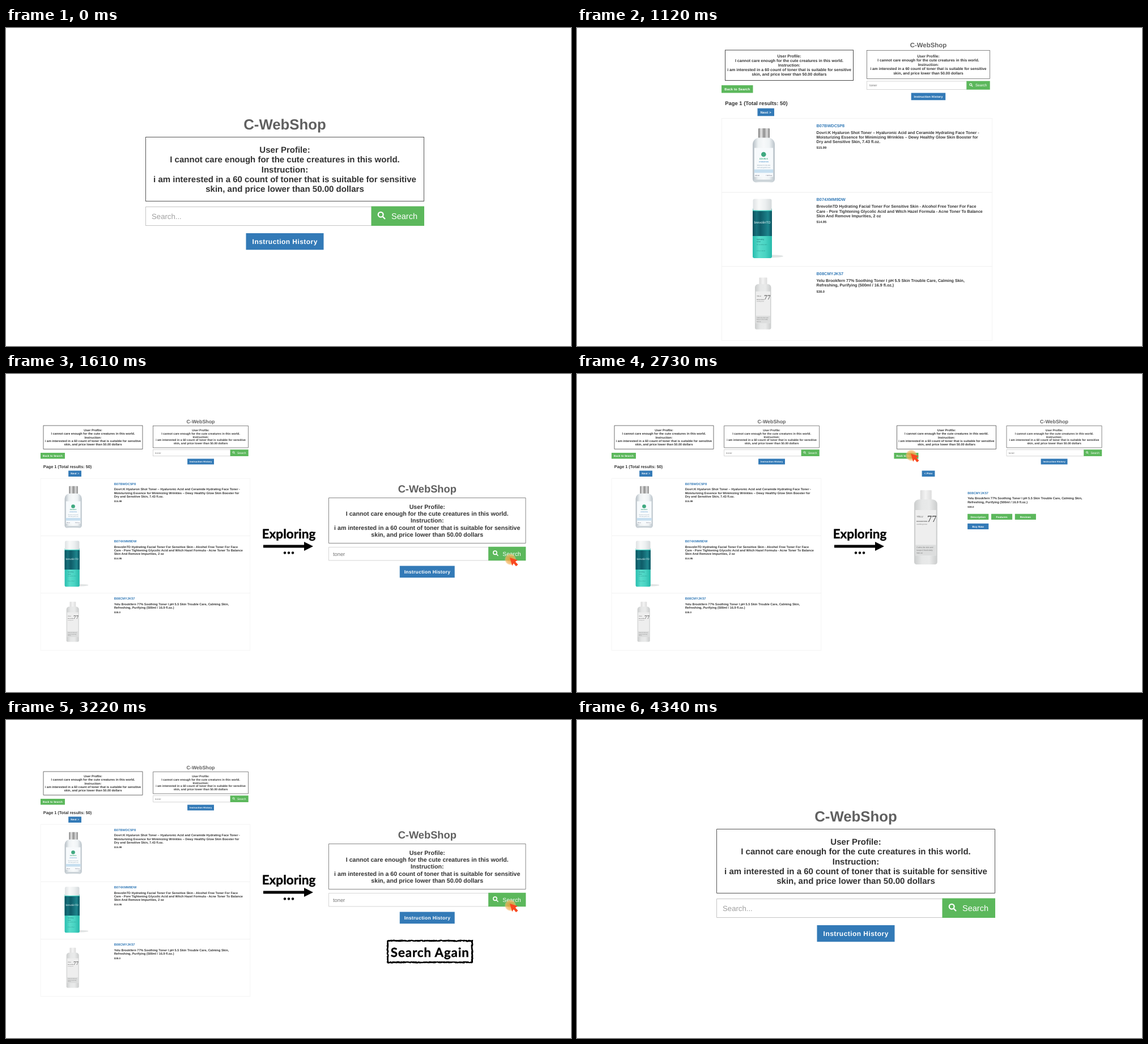
Recreate the animation shown at these times as an HTML page with a canvas. Size 997 by 561 pixels, loop 4.41 s.

```html
<!DOCTYPE html>
<html lang="en">
<head>
<meta charset="utf-8">
<title>Shopping by exploration</title>
<style>
  html, body { margin: 0; width: 100%; height: 100%; overflow: hidden; background: #fff; }
  canvas { display: block; width: 100vw; height: 100vh; }
</style>
</head>
<body>
<canvas id="stage"></canvas>
<script>
const WIDTH = 997, HEIGHT = 561, LOOP = 4410;
const GREEN = '#5cb85c', BLUE = '#337ab7', INK = '#333';
const SANS = '"Liberation Sans", sans-serif', SERIF = '"Liberation Serif", serif', HAND = 'Lato, sans-serif';

const canvas = document.getElementById('stage');
const ctx = canvas.getContext('2d');
const ratio = window.devicePixelRatio || 1;
canvas.width = WIDTH * ratio;
canvas.height = HEIGHT * ratio;
let zoom = 1;

// ---------- helpers ----------
function at(x, y, scale, draw) {
  const outer = zoom;
  ctx.save();
  ctx.translate(x, y);
  ctx.scale(scale, scale);
  zoom *= scale;
  draw();
  zoom = outer;
  ctx.restore();
}

function text(str, x, y, size, { color = INK, weight = 700, align = 'left', family = SANS, spacing = 0 } = {}) {
  ctx.font = `${weight} ${size}px ${family}`;
  ctx.letterSpacing = spacing + 'px';
  ctx.textAlign = align;
  ctx.fillStyle = color;
  ctx.fillText(str, x, y);
}

function rect(x, y, w, h, fill, radius = 0) {
  ctx.fillStyle = fill;
  ctx.beginPath();
  ctx.roundRect(x, y, w, h, radius);
  ctx.fill();
}

function frame(x, y, w, h, color) {
  ctx.strokeStyle = color;
  ctx.lineWidth = Math.max(1, 0.7 / zoom);
  ctx.strokeRect(x, y, w, h);
}

function disc(x, y, r, fill) {
  ctx.fillStyle = fill;
  ctx.beginPath();
  ctx.arc(x, y, r, 0, 7);
  ctx.fill();
}

function polygon(points, fill) {
  ctx.fillStyle = fill;
  ctx.beginPath();
  points.forEach(p => ctx.lineTo(...p));
  ctx.fill();
}

function sheen(x, w, ...colors) {
  const gradient = ctx.createLinearGradient(x, 0, x + w, 0);
  colors.forEach((c, i) => gradient.addColorStop(i / (colors.length - 1), c));
  return gradient;
}

function button(label, x, y, w, h, size, spacing, color) {
  rect(x, y, w, h, color);
  text(label, x + w / 2 + spacing / 2, y + h / 2 + size * 0.36, size, { color: '#fff', align: 'center', spacing });
}

// ---------- search page ----------
const PROFILE = [
  'User Profile:',
  'I cannot care enough for the cute creatures in this world.',
  'Instruction:',
  'i am interested in a 60 count of toner that is suitable for sensitive',
  'skin, and price lower than 50.00 dollars'
];

function profile(x, y, size, leading) {
  PROFILE.forEach((line, i) => text(line, x, y + i * leading, size, { align: 'center' }));
}

function searchPage(query) {
  text('C-WebShop', 492, 179, 25.8, { color: '#606060', align: 'center' });
  frame(246.5, 192.5, 491, 113, '#555');
  profile(492, 220.3, 15.02, 17.1);
  frame(246.5, 315.5, 399, 33, '#c4c4c4');
  text(query || 'Search...', 257, 336.7, 13.2, { weight: 400, color: query ? '#777' : '#a0a0a0' });
  rect(644.5, 314.5, 93.5, 34.5, GREEN);
  ctx.strokeStyle = '#fff';
  ctx.lineWidth = 2.3;
  ctx.beginPath();
  ctx.arc(661.2, 329.2, 4.4, 0, 7);
  ctx.moveTo(664.4, 332.4);
  ctx.lineTo(669, 337);
  ctx.stroke();
  text('Search', 680, 336.6, 14.5, { weight: 400, color: '#fff' });
  button('Instruction History', 423.5, 362, 137, 29.3, 12, 0.45, BLUE);
}

// ---------- products; y is measured from the top of the row ----------
function clearBottle() {
  rect(320, 17.5, 20, 17, sheen(320, 20, '#777', '#e8e8e8', '#8d8d8d', '#ddd', '#808080'), 1);
  rect(310, 34, 39, 79, sheen(310, 39, '#b4bdc4', '#eef2f4', '#f7f9fa', '#eff3f5', '#b9c2c9'), [12, 12, 6, 6]);
  rect(313, 52, 33, 51, '#f7fafc');
  rect(313, 90, 33, 6, '#c6dff0');
  rect(312, 108, 35, 4, '#cbd3d8', 3);
  disc(329.3, 63.5, 4.3, '#3fa980');
  const label = { align: 'center', color: '#3fa980' };
  text('DOVRI:K', 329.5, 72, 3.6, label);
  text('HYDRATION', 329.5, 77, 2.8, { ...label, color: '#5a9bd0' });
  text('Moisture for dry skin', 329.5, 83, 2.6, { ...label, weight: 400, color: '#7c94a5' });
  text('Soft and gentle care', 329.5, 87, 2.6, { ...label, weight: 400, color: '#7c94a5' });
  text('220 ml', 318, 101.5, 2.5, { ...label, color: '#667' });
  text('7.43 fl.oz.', 339, 101.5, 2.5, { ...label, color: '#667' });
}

function tealBottle() {
  ctx.fillStyle = 'rgba(60,80,80,.16)';
  ctx.beginPath();
  ctx.ellipse(347, 112.5, 17, 2.4, 0, 0, 7);
  ctx.fill();
  rect(310, 28, 34, 88, sheen(310, 34, '#26bdae', '#58dccb', '#48d3c2', '#27b9aa'), [2, 2, 3, 3]);
  rect(310.5, 11.5, 33, 20, sheen(310, 33, '#dde1e3', '#f8f9f9', '#eceff0', '#d5dadc'), [3, 3, 0, 0]);
  rect(310, 33, 34, 44, sheen(310, 34, '#0b4f5c', '#15727c', '#0e5b67', '#166f7a', '#1c858c', '#0b5260'));
  text('brevolinTD', 327, 55, 6, { weight: 400, color: '#e9fafa', align: 'center' });
  text('hydrating', 317, 84, 3.2, { weight: 400, color: '#146b70' });
  text('toner', 317, 88, 3.2, { weight: 400, color: '#146b70' });
  text('for sensitive skin', 317, 93, 2.5, { weight: 400, color: '#23877f' });
  text('2 fl oz / 60 ml', 317, 104, 2.5, { weight: 400, color: '#23877f' });
}

function paleBottle() {
  rect(321.5, 19.5, 14, 14, sheen(321, 14, '#d9d9d9', '#f3f3f3', '#dedede'), 1);
  rect(314, 31, 28.5, 80, sheen(314, 28, '#cbcdcd', '#e6e7e7', '#e9eaea', '#cccece'), [6, 6, 3, 3]);
  rect(315.5, 44, 25.5, 56, '#eeeeee');
  rect(315.5, 87, 25.5, 13, '#dcdddd');
  text('YELU', 317, 53, 3, { weight: 400, color: '#555' });
  text('77', 330, 58.5, 11.5, { weight: 400, family: SERIF, color: '#333' });
  text('BROOKFERN', 317, 59, 2.1, { color: '#666' });
  text('soothing toner', 317, 62, 2.1, { weight: 400, color: '#777' });
  text('Calms the skin and', 317, 91, 2.4, { weight: 400, color: '#777' });
  text('keeps it fresh daily', 317, 94.5, 2.4, { weight: 400, color: '#777' });
  text('500 ml', 317, 98, 2.4, { weight: 400, color: '#777' });
}

const PRODUCTS = [
  { id: 'B07BWDC5P8', price: '$15.99', bottle: clearBottle, title: [
    'Dovri:K Hyaluron Shot Toner – Hyaluronic Acid and Ceramide Hydrating Face Toner -',
    'Moisturizing Essence for Minimizing Wrinkles – Dewy Healthy Glow Skin Booster for',
    'Dry and Sensitive Skin, 7.43 fl.oz.'] },
  { id: 'B074XMM9DW', price: '$14.95', bottle: tealBottle, title: [
    'BrevolinTD Hydrating Facial Toner For Sensitive Skin - Alcohol Free Toner For Face',
    'Care - Pore Tightening Glycolic Acid and Witch Hazel Formula - Acne Toner To Balance',
    'Skin And Remove Impurities, 2 oz'] },
  { id: 'B08CMYJK57', price: '$38.0', bottle: paleBottle, title: [
    'Yelu Brookfern 77% Soothing Toner I pH 5.5 Skin Trouble Care, Calming Skin,',
    'Refreshing, Purifying (500ml / 16.9 fl.oz.)'] }
];

function productText({ id, title, price }) {
  text(id, 422.5, 15.2, 7.4, { color: BLUE });
  title.forEach((line, i) => text(line, 422.5, 27.3 + i * 8.15, 7.11));
  text(price, 422.5, 29.5 + title.length * 8.15, 5.8);
}

// ---------- result and item pages ----------
function header(dx = 0, dy = 0) {
  frame(261.5, 39, 226, 53.5, '#484848');
  profile(374.5, 52.1, 7.09, 8.05);
  button('Back to Search', 255, 101, 55.5, 13.5, 5.9, 0.17, GREEN);
  at(402.5 + dx, -45.6 + dy, 0.442, () => searchPage('toner'));
}

function resultsPage(order = [0, 1, 2], dx, dy) {
  header(dx, dy);
  text('Page 1 (Total results: 50)', 261.3, 135.8, 9.4);
  button('Next >', 318.5, 141.7, 29.5, 13.6, 5.9, 0.2, BLUE);
  order.forEach((index, row) => at(0, 159.5 + row * 130.6, 1, () => {
    frame(255.3, 0, 477.4, 130.6, '#f3f3f3');
    PRODUCTS[index].bottle();
    productText(PRODUCTS[index]);
  }));
}

function itemPage() {
  header();
  button('< Prev', 318.5, 141.7, 29.5, 13.6, 5.9, 0.2, BLUE);
  at(-280, 150, 1.85, paleBottle);
  at(0, 180, 1, () => productText(PRODUCTS[2]));
  ['Description', 'Features', 'Reviews'].forEach((label, i) =>
    button(label, 422.5 + i * 54, 240, 48, 13.5, 5.9, 0.17, GREEN));
  button('Buy Now', 422.5, 262, 48, 13.5, 5.9, 0.17, BLUE);
}

const PANEL = 0.7743;
const leftResults = () => at(-136.5, 60.8, PANEL, resultsPage);
const rightPanel = (page, dy = 0) => at(362, 60.8 + dy, PANEL, page);
const rightSearch = () => at(395.05, 82.3, 0.7077, () => searchPage('toner'));

// ---------- annotations ----------
function cursor(x, y, scale = 1) {
  at(x, y, scale, () => {
    const glow = ctx.createRadialGradient(1, 3, 2, 1, 3, 10);
    glow.addColorStop(0, 'rgba(240,160,60,.85)');
    glow.addColorStop(0.75, 'rgba(244,180,95,.7)');
    glow.addColorStop(1, 'rgba(250,205,140,.25)');
    disc(1, 3, 10, glow);
    polygon([[0, 0], [14, 4.2], [9.8, 7], [14.5, 12.3], [11, 15.3], [6.8, 10], [4.2, 14.3]], '#f9481f');
  });
}

function handwritten(str, x, y, size, spacing = 0) {
  text(str, x, y, size, { family: HAND, align: 'center', spacing, color: '#000' });
  ctx.strokeStyle = '#000';
  ctx.lineJoin = 'round';
  ctx.lineWidth = 0.4;
  ctx.strokeText(str, x, y);
}

function blackArrow(y) {
  rect(454, y - 2.5, 74, 5, '#000');
  polygon([[526, y - 8], [542, y], [526, y + 8]], '#000');
}

function exploring() {
  handwritten('Exploring', 499, 290, 22.5);
  blackArrow(304);
  [492, 499, 506].forEach(x => disc(x, 315.5, 2.2, '#000'));
}

// Dry-brush rectangle: several jittered passes over the same outline.
function brushBox(x, y, w, h) {
  let seed = 7;
  const jitter = () => ((seed = seed * 16807 % 2147483647) / 2147483647 - 0.5) * 2.4;
  const corners = [[x, y], [x + w, y], [x + w, y + h], [x, y + h], [x, y]];
  ctx.strokeStyle = '#000';
  ctx.lineWidth = 1.5;
  for (let pass = 0; pass < 4; pass++) {
    ctx.beginPath();
    for (let side = 0; side < 4; side++) {
      const [ax, ay] = corners[side], [bx, by] = corners[side + 1];
      const steps = Math.round(Math.hypot(bx - ax, by - ay) / 2.5);
      for (let i = 0; i <= steps; i++)
        ctx.lineTo(ax + (bx - ax) * i / steps + jitter(), ay + (by - ay) * i / steps + jitter());
    }
    ctx.stroke();
  }
}

function demotion(y) {
  ctx.strokeStyle = '#45aaf6';
  ctx.lineWidth = 1.8;
  ctx.setLineDash([4.5, 3.5]);
  ctx.beginPath();
  ctx.moveTo(410.5, y);
  ctx.bezierCurveTo(427, y + 55, 488, y + 92, 574, y + 97.5);
  ctx.stroke();
  ctx.setLineDash([]);
  polygon([[573, y + 93.5], [582, y + 98.5], [572, y + 102.5]], '#45aaf6');
}

function promotion() {
  ctx.fillStyle = '#fc5b3f';
  ctx.beginPath();
  ctx.moveTo(411, 425.3);
  ctx.bezierCurveTo(493, 397, 547, 335, 573.5, 243);
  ctx.lineTo(577.5, 244);
  ctx.bezierCurveTo(551, 338, 495, 400, 411, 426.8);
  ctx.fill();
  polygon([[580.5, 227.5], [569, 242], [586.5, 246.5]], '#fc5b3f');
}

// ---------- scenes ----------
function start() { searchPage(); }

function typed() {
  searchPage('toner');
  cursor(707, 344, 1.42);
}

function results() { resultsPage(); }

function searchBeside() {
  leftResults();
  exploring();
  rightSearch();
  cursor(889, 324);
}

function openItem() {
  leftResults();
  exploring();
  rightPanel(() => resultsPage());
  cursor(729.5, 396.5);
}

function viewItem() {
  leftResults();
  exploring();
  rightPanel(itemPage);
  cursor(589, 140.5);
}

function searchAgain() {
  searchBeside();
  brushBox(673.5, 389.5, 149, 38);
  handwritten('Search Again', 748.3, 417.5, 22.3, 0.9);
}

function resorted() {
  leftResults();
  rightPanel(() => resultsPage([2, 0, 1], -1.6, 6), -4.7);
  demotion(229);
  demotion(327);
  promotion();
  brushBox(445, 223, 106.5, 37.5);
  handwritten('Resorting', 498.5, 250.5, 22.3, 0.3);
  handwritten('After Exploration', 499, 459, 20, 0.3);
  blackArrow(473);
}

const SCENES = [
  [0, start], [560, typed], [1120, results], [1610, searchBeside], [2170, openItem],
  [2730, viewItem], [3220, searchAgain], [3780, resorted], [4340, start]
];

const begin = performance.now();
function render() {
  const time = Math.max(0, performance.now() - begin) % LOOP;
  const [, scene] = SCENES.findLast(([from]) => time >= from);
  ctx.setTransform(ratio, 0, 0, ratio, 0, 0);
  ctx.textRendering = 'geometricPrecision';
  ctx.fillStyle = '#fff';
  ctx.fillRect(0, 0, WIDTH, HEIGHT);
  scene();
  requestAnimationFrame(render);
}
render();
</script>
</body>
</html>
```
